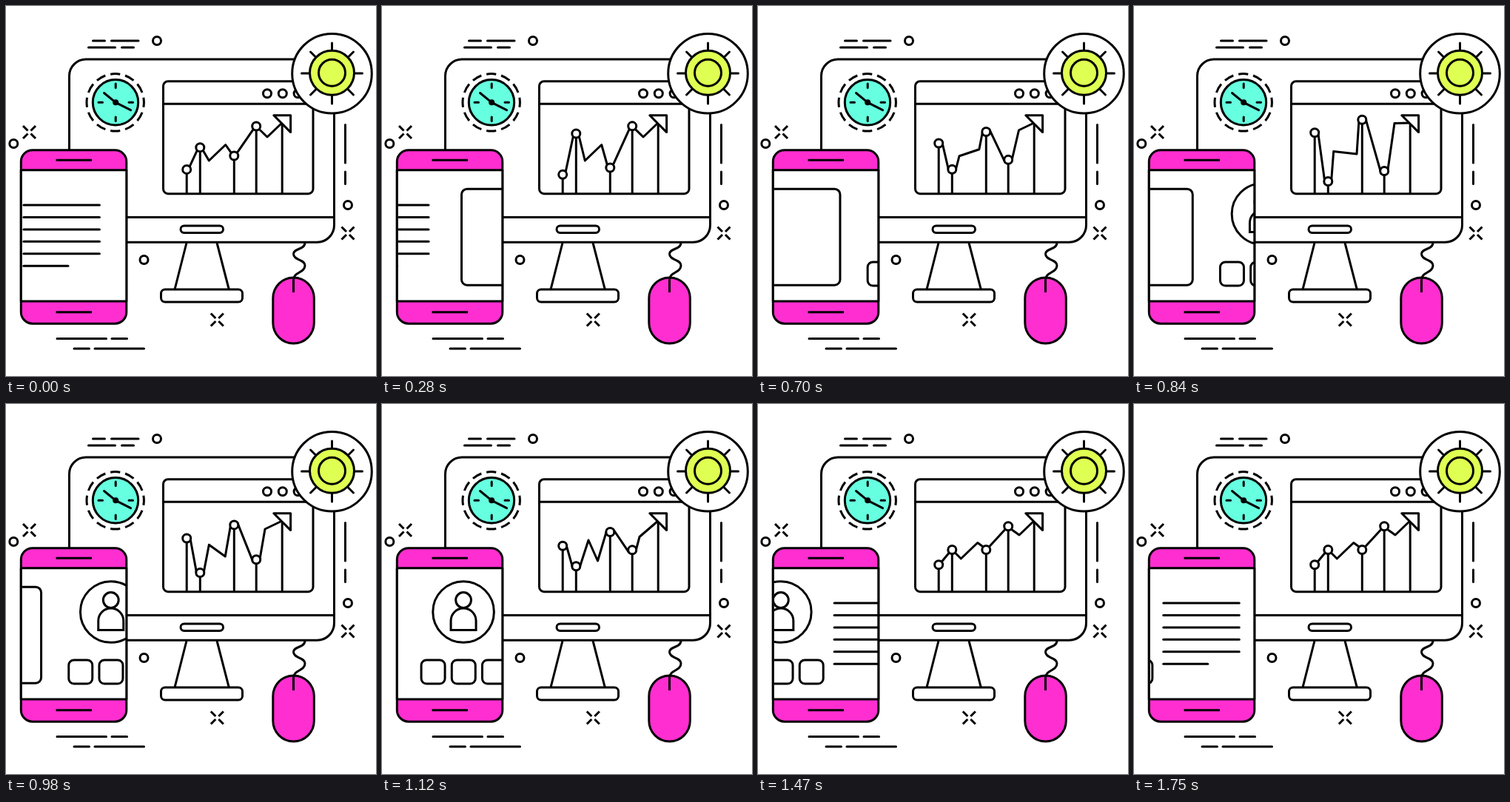
Recreate the animation shown at these times as an HTML page. Size 500x500 px, loop 1820 ms.

```html
<!DOCTYPE html>
<html lang="en">
<head>
<meta charset="utf-8">
<title>Devices</title>
<style>
  html, body { margin: 0; width: 100%; height: 100%; overflow: hidden; background: #fff; }
  svg { display: block; width: 100%; height: 100%; }
</style>
</head>
<body>
<svg viewBox="0 0 500 500" fill="none" stroke="#000" stroke-width="3" stroke-linejoin="round">
  <defs>
    <clipPath id="screen"><rect x="21.5" y="221" width="141" height="178"/></clipPath>
    <path id="spark" d="M-8.500-8.500l6.500 6.500M8.500-8.500l-6.500 6.500M-8.500 8.500l6.500-6.500M8.500 8.500l-6.500-6.500"/>
    <circle id="ring" r="5.500"/>
    <path id="ray" d="M0-30V-41"/>
  </defs>

  <!-- loose marks -->
  <path stroke-linecap="round" d="M117.500 47H133.500M142.500 47H179M111.500 56H147.500M156.500 56H172.500
    M69 449.500H135.500M143 449.500H163.500M92 463H112.500M120 463H186.500
    M458.500 160.500V212M458.500 224V240.500"/>
  <use href="#ring" x="204" y="47"/>
  <use href="#ring" x="10.300" y="186"/>
  <use href="#ring" x="186.500" y="343"/>
  <use href="#ring" x="462" y="269"/>
  <use href="#spark" x="31.500" y="170.500"/>
  <use href="#spark" x="285.300" y="424"/>
  <use href="#spark" x="462" y="307"/>

  <!-- monitor -->
  <path d="M108 72H443.500V296a23 23 0 0 1-23 23.200H85.500V94.500A22.500 22.500 0 0 1 108 72Z M85.500 285.500H443.500"/>
  <rect x="236" y="297" width="57.500" height="9.500" rx="4.700"/>
  <path d="M244 320L228 383M285 320L301.300 383"/>
  <rect x="209.500" y="383" width="110" height="17" rx="5.500"/>
  <rect x="212.500" y="101.700" width="202.500" height="152" rx="6.500"/>
  <path d="M212.500 132.300H415"/>
  <use href="#ring" x="353" y="118.200"/>
  <use href="#ring" x="373.800" y="118.200"/>
  <use href="#ring" x="394.600" y="118.200"/>

  <!-- clock -->
  <circle cx="147.700" cy="130.300" r="38.700" pathLength="120" stroke-dasharray="6.500 3.500" stroke-dashoffset="3.250"/>
  <circle cx="148" cy="130.300" r="30.700" fill="#66ffe0"/>
  <path stroke-linecap="round" d="M148.200 105V110.500M148.200 150V155.500M125 130.300H130.500M166 130.300H171.500
    M132.500 117.500L148.200 130.300L168.500 140.700"/>
  <circle cx="148.200" cy="130.300" r="4" fill="#000" stroke="none"/>

  <!-- chart -->
  <path id="stems"/>
  <path id="graph"/>
  <path d="M361.800 147.800H384.600V170.600Z" fill="#fff"/>
  <g id="dots" fill="#fff"></g>

  <!-- gear badge -->
  <circle cx="440.500" cy="91.200" r="53.800" fill="#fff"/>
  <g id="gear" transform="translate(440.500 91)" stroke-linecap="round"></g>
  <circle cx="440.500" cy="90.300" r="30" fill="#dfff52"/>
  <circle cx="440.500" cy="90.300" r="18"/>

  <!-- mouse -->
  <rect x="360.800" y="367" width="55.500" height="89" rx="27.700" fill="#ff2ed0"/>
  <path d="M388.500 387V370C388.500 359 404 361 404 350.500C404 342 388.500 344 388.500 335C388.500 327 404 330 404 319.500"/>

  <!-- phone -->
  <rect x="20.300" y="194.700" width="142.500" height="234.500" rx="15.500" fill="#ff2ed0"/>
  <rect x="20.300" y="221.700" width="142.500" height="177.300" fill="#fff" stroke="none"/>
  <g clip-path="url(#screen)"><g id="strip"></g></g>
  <path d="M20.300 221.700H162.800V399H20.300Z M67.500 208.200H116M67.500 413.700H116"/>
</svg>

<script>
const LOOP = 1820, STEP = 70, TRAVEL = 412;
const NS = 'http://www.w3.org/2000/svg';
const $ = id => document.getElementById(id);

function add(parent, tag, attrs) {
  const el = document.createElementNS(NS, tag);
  for (const k in attrs) el.setAttribute(k, attrs[k]);
  return parent.appendChild(el);
}

for (let a = 0; a < 360; a += 45) add($('gear'), 'use', { href: '#ray', transform: `rotate(${a})` });

// Phone pages: text, empty card, profile
function drawPages(x0) {
  const pages = add($('strip'), 'g', { transform: `translate(${x0} 0)` });
  for (let i = 0; i < 6; i++)
    add(pages, 'path', { d: `M0 ${269 + i * 16.45}h${i < 5 ? 102.5 : 60}`, 'stroke-linecap': 'round' });
  add(pages, 'rect', { x: 147, y: 247.2, width: 98.5, height: 130, rx: 7.5 });
  const profile = add(pages, 'g', { transform: 'translate(339.7 0)' });
  add(profile, 'circle', { cy: 281, r: 41.3 });
  add(profile, 'circle', { cy: 265, r: 10.4 });
  add(profile, 'path', { d: 'M-17 305.5V293a17 17 0 0 1 34 0V305.5Z', 'stroke-linejoin': 'miter' });
  for (let i = 0; i < 3; i++)
    add(profile, 'rect', { x: -57 + i * 41.2, y: 346, width: 32, height: 32, rx: 7 });
}
drawPages(23.9);
drawPages(23.9 + TRAVEL);

// Chart poses: heights of the four points, and x, y of the three loose corners
const stemX = [244.2, 262.3, 308.3, 338.2];
const rest = [217.3, 197, 197, 165.3];
const crest = [244, 154, 237, 145];
const trough = [171.3, 237, 153.8, 223];
const level = [274.3, 209, 296.7, 187.5, 353, 177];
const flat = [269.7, 196.5, 301, 200, 352, 158.5];
const steep = [279, 184, 291.5, 212, 348, 179.5];

const LEAD = 70; // the swing starts this long before the loop point
const linear = f => f, easeIn = f => f * f;
const swing = [[0, rest], [190, crest, easeIn], [910, trough], [1540, rest], [LOOP, rest]];
const bend = [[0, level], [630, level], [910, flat], [1190, steep], [1540, level], [LOOP, level]];

function poseAt(track, t) {
  const i = track.findIndex(key => key[0] > t);
  const [t0, from] = track[i - 1], [t1, to, ease = linear] = track[i];
  const f = ease((t - t0) / (t1 - t0));
  return from.map((v, j) => v + (to[j] - v) * f);
}

const dots = stemX.map(cx => add($('dots'), 'circle', { cx, r: 5.5 }));

function render(now) {
  const t = Math.floor((now % LOOP) / STEP) * STEP;
  $('strip').setAttribute('transform', `translate(${-TRAVEL * t / LOOP} 0)`);

  const u = (t + LEAD) % LOOP;
  const y = poseAt(swing, u), c = poseAt(bend, u);
  // Lines meet each dot on its rim, 4 px off centre both ways
  const rim = (i, dx, dy) => [stemX[i] + dx, y[i] + dy];
  const lines = [
    [rim(0, 4, -4), rim(1, -4, 4)],
    [rim(1, 4, 4), c.slice(0, 2), c.slice(2, 4), rim(2, -4, -4)],
    [rim(2, 4, -4), rim(3, -4, 4)],
    [rim(3, 4, 4), c.slice(4), [373, 158]]
  ];
  $('graph').setAttribute('d', lines.map(l => 'M' + l.join('L')).join(''));
  $('stems').setAttribute('d', stemX.map((x, i) => `M${x} ${y[i]}V253`).join('') + 'M373.2 158V253');
  dots.forEach((dot, i) => dot.setAttribute('cy', y[i]));
}

const start = performance.now();
function tick() {
  render(performance.now() - start);
  requestAnimationFrame(tick);
}
tick();
</script>
</body>
</html>
```
